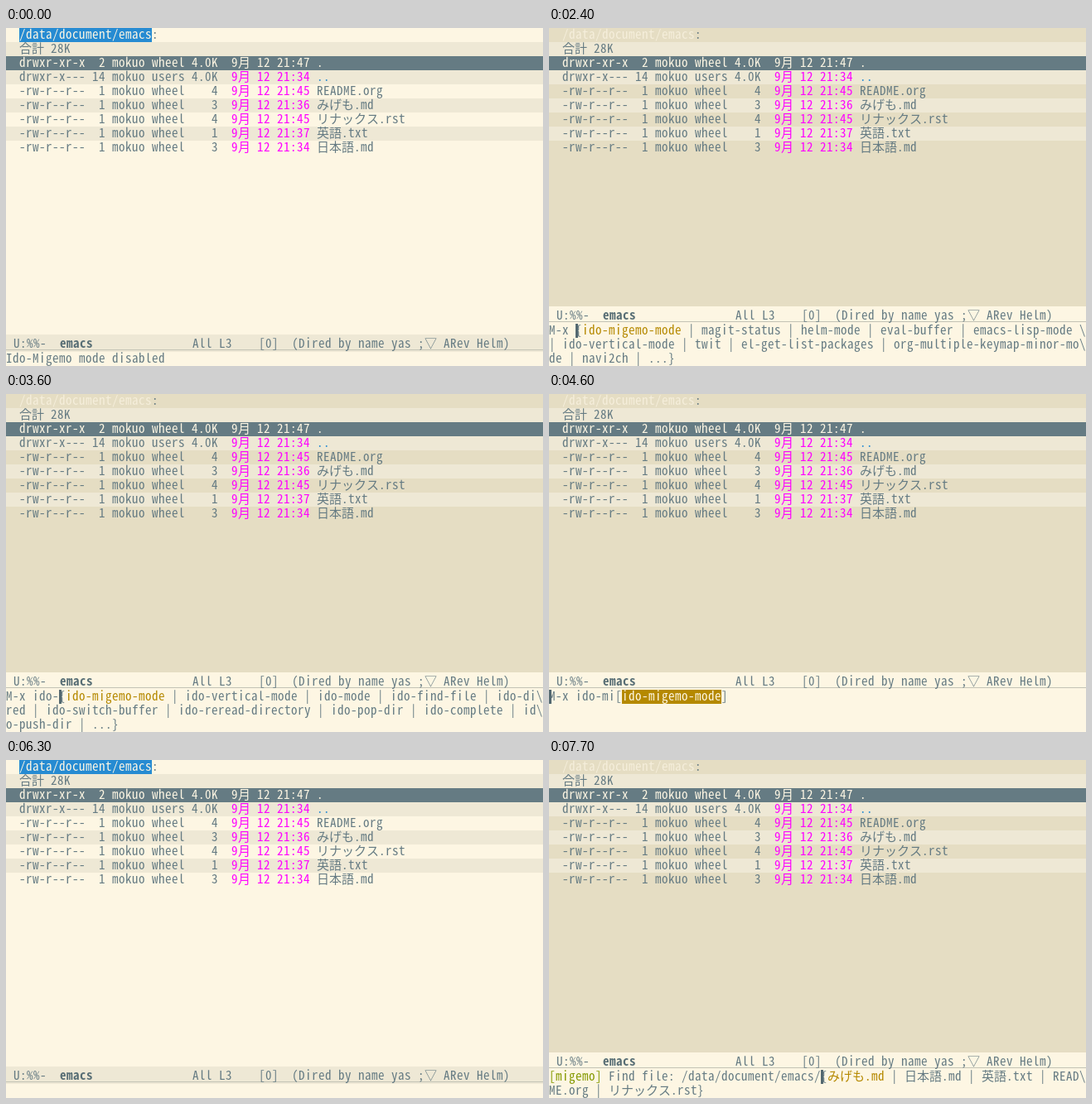
Write an HTML page that moves like this. It is 648 px wide and 408 px high and loops after 8 s.

```html
<!DOCTYPE html>
<html lang="ja">
<head>
<meta charset="utf-8">
<title>Ido-Migemo</title>
<style>
  html, body { margin: 0; width: 100%; height: 100%; overflow: hidden; background: #fdf6e3; }
  svg { display: block; }
  text { font: 15px "Noto Sans Mono CJK JP", "Noto Sans Mono", "Noto Sans CJK JP", monospace; fill: #657b83; }
  .bold { font-weight: bold; fill: #586e75; }
  .light { fill: #fdf6e3; }
  .faded { fill: #f5eedb; }
  .date { fill: #f0f; }
  .blue { fill: #268bd2; }
  .gold { fill: #b58900; }
  .green { fill: #859900; }
</style>
</head>
<body>
<svg id="stage" width="648" height="408"></svg>
<script>
const W = 648, H = 408, ROW = 17, WRAP = 640, LOOP = 8000;
const stage = document.getElementById('stage');

const cell = c => c > '\u2000' ? 15 : 8;
const width = s => [...s].reduce((sum, c) => sum + cell(c), 0);
const rect = (x, y, w, h, fill) => `<rect x="${x}" y="${y}" width="${w}" height="${h}" fill="${fill}"/>`;

// Text on the character grid; every glyph gets its own x.
function text(x, base, s, cls = '') {
  const xs = [...s].map(c => { const at = x; x += cell(c); return at; });
  return `<text class="${cls}" x="${xs.join(' ')}" y="${base}">${s.replaceAll(' ', '\u00a0')}</text>`;
}

function line(x, base, parts) {
  return parts.map(([s, cls]) => {
    const out = text(x, base, s, cls);
    x += width(s);
    return out;
  }).join('');
}

// Each entry: mode and links, group, size, time, name
const files = [
  ['drwxr-xr-x  2', 'wheel', '4.0K', '21:47', '.'],
  ['drwxr-x--- 14', 'users', '4.0K', '21:34', '..'],
  ['-rw-r--r--  1', 'wheel', '4', '21:45', 'README.org'],
  ['-rw-r--r--  1', 'wheel', '3', '21:36', 'みげも.md'],
  ['-rw-r--r--  1', 'wheel', '4', '21:45', 'リナックス.rst'],
  ['-rw-r--r--  1', 'wheel', '1', '21:37', '英語.txt'],
  ['-rw-r--r--  1', 'wheel', '3', '21:34', '日本語.md']
];

function listing(dim) {
  const path = '/data/document/emacs';
  let out = rect(0, 0, W, H, dim ? '#e5ddc3' : '#fdf6e3');
  for (let i = 1; i < 9; i += 2) out += rect(0, i * ROW, W, ROW, '#eee8d5');
  out += rect(0, 2 * ROW, W, ROW, '#657b83');
  if (!dim) out += rect(16, 0, width(path), ROW, '#268bd2');
  out += line(16, 13, [[path, dim ? 'faded' : 'light'], [':']]);
  out += text(16, ROW + 13, '合計 28K');
  files.forEach(([mode, group, size, time, name], i) => {
    const current = i === 0 ? 'light' : '';
    out += line(16, (i + 2) * ROW + 13, [
      [`${mode} mokuo ${group} ${size.padStart(4)}  `, current],
      [`9月 12 ${time} `, current || 'date'],
      [name, current || (name === '..' ? 'blue' : '')]
    ]);
  });
  return out;
}

function modeline(top, dim) {
  return rect(0, top, W, 21, dim ? '#fdf6e3' : '#eee8d5') +
    rect(0, top + 18, W, 1, '#c3c3b5') +
    line(1, top + 16, [
      [' U:%%-  '], ['emacs', 'bold'],
      [' '.repeat(15) + 'All L3    [0]  (Dired by name yas ;▽ ARev Helm)']
    ]);
}

// Minibuffer text, broken with a backslash in the last column.
function minibuffer(top, parts) {
  let x = 0, y = top, out = rect(0, top, W, H - top, '#fdf6e3');
  for (const [s, cls, bg] of parts) {
    let start = x, chunk = '';
    const flush = () => {
      if (bg) out += rect(start, y, x - start, ROW, bg);
      if (chunk) out += text(start, y + 13, chunk, cls);
    };
    for (const c of s) {
      if (x + cell(c) > WRAP) {
        flush();
        out += text(WRAP, y + 13, '\\');
        x = start = 0;
        y += ROW;
        chunk = '';
      }
      chunk += c;
      x += cell(c);
    }
    flush();
  }
  return out;
}

function render({ rows = 1, dim = false, parts = [], cursor = -1 }) {
  const top = H - rows * ROW;
  stage.innerHTML = listing(dim) + modeline(top - 21, dim) + minibuffer(top, parts) +
    (cursor < 0 ? '' : rect(cursor, top, 3, ROW, '#536870'));
}

function ask(typed, list) {
  const [first, ...rest] = list.split(' ');
  return {
    rows: 3, dim: true, cursor: 8 * (4 + typed.length),
    parts: [[`M-x ${typed}{`], [first, 'gold'], [` | ${rest.join(' | ')} | ...}`]]
  };
}

const recent = 'ido-migemo-mode magit-status helm-mode eval-buffer emacs-lisp-mode ido-vertical-mode twit el-get-list-packages org-multiple-keymap-minor-mode navi2ch';
const withI = recent.replace('helm-mode eval-buffer ', '') + ' ido-mode ido-find-file';
const withIdo = 'ido-migemo-mode ido-vertical-mode ido-mode ido-find-file ido-dired ido-switch-buffer ido-reread-directory ido-pop-dir ido-complete ido-push-dir';
const withM = 'ido-migemo-mode ido-mode ido-make-directory ido-magic-forward-char ido-magic-backward-char ido-magic-delete-char ido-merge-work-directories';

const only = {
  rows: 3, dim: true,
  parts: [['M-x ido-mi['], ['ido-migemo-mode', 'light', '#b58900'], [']']]
};
const find = {
  rows: 2, dim: true,
  parts: [
    ['[migemo]', 'green'], [' Find file: /data/document/emacs/{'], ['みげも.md', 'gold'],
    [' | 日本語.md | 英語.txt | README.org | リナックス.rst}']
  ]
};

const states = [
  [0, { parts: [['Ido-Migemo mode disabled']] }],
  [2400, ask('', recent)],
  [2800, ask('i', withI)],
  [3200, ask('ido', withIdo)],
  [3600, ask('ido-', withIdo)],
  [3800, ask('ido-m', withM)],
  [3900, { ...only, cursor: 80 }],
  [4400, only],
  [4600, { ...only, cursor: 0 }],
  [4700, { parts: [['Ido-Migemo mode enabled']] }],
  [6300, {}],
  [6800, { ...find, cursor: 328 }],
  [7200, find],
  [7700, { ...find, cursor: 328 }]
];

const begin = performance.now();
let shown;
function tick() {
  const t = (performance.now() - begin) % LOOP;
  const state = states.findLast(([at]) => at <= t)[1];
  if (state !== shown) render(shown = state);
  requestAnimationFrame(tick);
}
tick();
</script>
</body>
</html>
```
